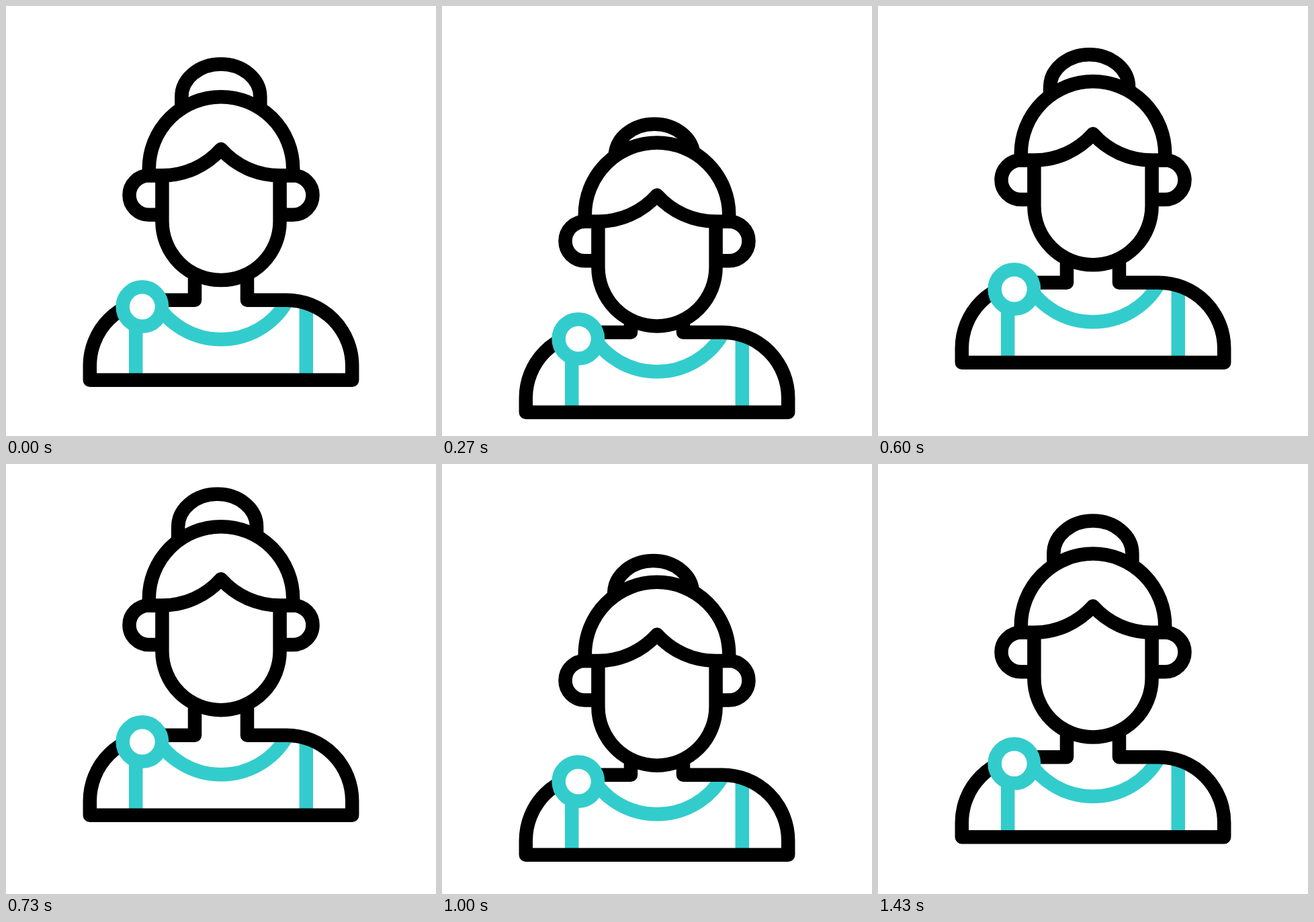
Write an HTML page that moves like this. It is 640 px wide and 640 px high and loops after 1.67 s.

```html
<!DOCTYPE html>
<html lang="en">
<head>
<meta charset="utf-8">
<title>Woman avatar</title>
<style>
  html, body { margin: 0; height: 100%; overflow: hidden; background: #fff; }
  svg { display: block; width: 100%; height: 100%; fill: none; stroke: #000; stroke-width: 20.5; stroke-linejoin: round; }
  .teal { stroke: #3cc; }
  .solid { fill: #fff; }
</style>
</head>
<body>
<svg viewBox="0 0 640 640">
  <g id="body">
    <path class="teal" d="M193.2 450V550M446.8 445V550M222 438A113 113 0 0 0 418 438"/>
    <path d="M281 385V436.2H222.4A97.6 97.6 0 0 0 124.8 533.8V555.2H515.2V533.8A97.6 97.6 0 0 0 417.6 436.2H359V385"/>
    <circle class="teal solid" cx="202.8" cy="446" r="29.2"/>
  </g>
  <path id="bun" d="M261.4 165V133.3A58.5 48.8 0 0 1 378.4 133.3V165"/>
  <g id="head" class="solid">
    <path id="ear" d="M232.4 250.8H212.7A29.25 29.25 0 0 0 212.7 309.3H232.4"/>
    <use href="#ear" transform="matrix(-1 0 0 1 640 0)"/>
    <path d="M232.4 250.8V318.9A87.6 87.6 0 0 0 407.6 318.9V250.8"/>
    <path d="M212.8 250.8V240.8A107.2 107.2 0 0 1 427.2 240.8V250.8H407.6A117.2 117.2 0 0 1 320 211.5A117.2 117.2 0 0 1 232.4 250.8Z"/>
  </g>
</svg>
<script>
  const LOOP = 1670;

  function move(id, x, y) {
    document.getElementById(id).setAttribute("transform", `translate(${x} ${y})`);
  }

  function draw(now) {
    // 30 steps per second, with step times rounded to 10 ms
    const tick = Math.floor((Math.floor(now % LOOP / 10) + 0.5) * 0.3);

    // smooth rise from 0 to 1 between two ticks
    const rise = (from, to) => {
      const u = Math.min(1, Math.max(0, (tick - from) / (to - from)));
      return u * u * (3 - 2 * u);
    };

    // how far a part trails the one below it: down, up to `top`, down, back to rest
    const lag = (start, top) =>
      25.2 * rise(start, 11) + (top - 25.2) * rise(11, 22.5)
      + (21.5 - top) * rise(22.5, 33) - 21.5 * rise(33, 43);

    const body = 49.5 * rise(-0.9, 7.6) - 83.8 * rise(8.4, 20.6)
      + 61.8 * rise(21, 30.7) - 27.5 * rise(30.7, 40.7);
    const head = body + lag(0.2, -8);
    const bun = head + lag(-0.9, 0.5);
    const bunShift = 5.3 * (rise(32.2, 43) - rise(-0.9, 12.8));

    move("body", 0, body);
    move("head", 0, head);
    move("bun", bunShift, bun);
  }

  const start = performance.now();
  function loop() {
    draw(performance.now() - start);
    requestAnimationFrame(loop);
  }
  loop();
</script>
</body>
</html>
```
